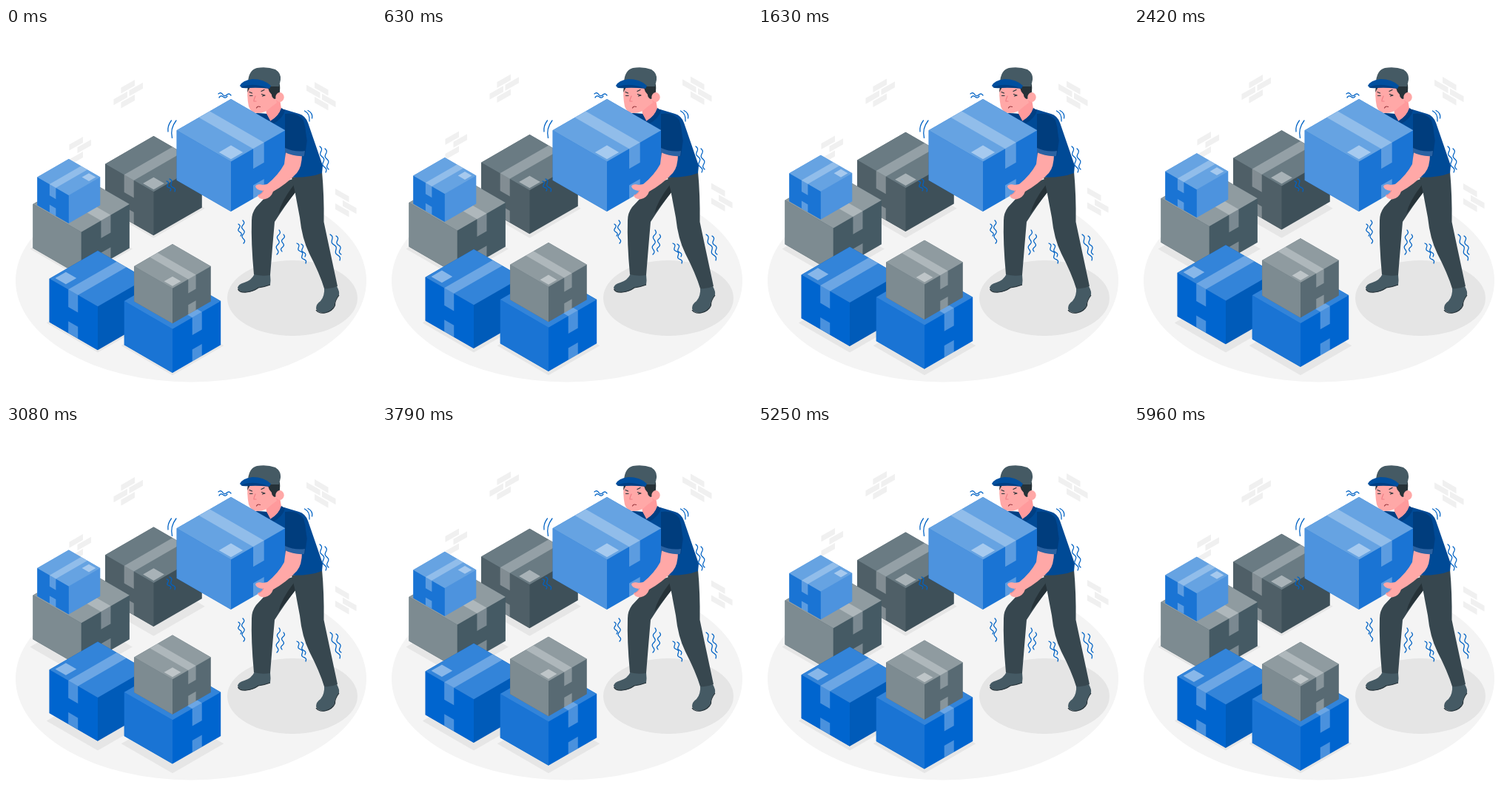
These frames come from a looping animation (500 px wide and 500 px high, 6000 ms). An HTML page:

```html
<!DOCTYPE html>
<html lang="en">
<head>
<meta charset="utf-8">
<title>Moving boxes</title>
<style>
html, body { margin: 0; height: 100%; overflow: hidden; background: #fff; }
svg { display: block; width: 100vw; height: 100vh; }
.lines { fill: none; stroke: #0062c4; stroke-width: 1.25; stroke-linecap: round; stroke-linejoin: round; }
</style>
</head>
<body>
<svg viewBox="0 0 500 500">
  <g id="bricks" fill="#f0f0f0"></g>
  <ellipse cx="250" cy="341.5" rx="237" ry="137" fill="#f4f4f4"/>
  <ellipse cx="387" cy="365" rx="88" ry="51" fill="#e5e5e5"/>
  <g id="shadows" fill="#e6e6e6"></g>
  <g id="pile"></g>

  <!-- legs and shoes -->
  <path fill="#455a64" d="M336 332L357 333Q358 341 357 347Q349 350 341 351Q334 357 324 357Q314 357 313 351Q314 346 322 344Q332 341 336 332Z"/>
  <path fill="none" stroke="#263238" stroke-width="1.2" d="M313.500 353Q316 358 325 357Q334 356 341 351Q349 350 357 347"/>
  <path fill="#455a64" d="M430 350L447 349Q451 356 450 361Q444 368 444 375Q440 384 431 385Q420 385 419 379Q419 373 425 369Q431 362 430 350Z"/>
  <path fill="none" stroke="#263238" stroke-width="1.2" d="M419 381Q422 386 431 385Q441 383 444.500 375Q444 369 450 361"/>
  <path fill="#37474f" d="M356 214L394 202L391 222Q377 240 363 262Q360 296 357 334Q346 336 335 333Q331 290 332 260Q332 250 338 242L352 227Z"/>
  <path fill="#263238" d="M389 212L391 222L368 251Q372 234 389 212Z"/>
  <path fill="#37474f" d="M386 202L427 194Q430 226 429.500 262Q435 288 448 349Q439 353 430 352Q424 332 410 305Q400 285 397 256L390 219Z"/>

  <!-- torso -->
  <path fill="#004a96" d="M336 115L354 116L376 110L396 116Q404 118 408 128L428 186L427 196Q407 204 374 201L350 180Z"/>
  <path fill="#003f83" d="M403 133L407 152L404 173L389 173L387 160Z"/>

  <!-- head -->
  <path fill="#ff9a9c" d="M350 100L370 96L372 109Q369 119 357 126L352 116Z"/>
  <path fill="#ffa8a7" d="M327 77Q325 91 328 106Q331 115 340 115Q351 115 358 107L366 101Q363 86 356 77Z"/>
  <path fill="#263238" d="M351 78L370 76Q371 86 368 94L363 96Q359 94 359 90Q355 86 354 81Z"/>
  <path fill="#263238" d="M327 79L331 78L326 87Z"/>
  <ellipse cx="370" cy="93.500" rx="5.700" ry="6.500" fill="#ffa8a7"/>
  <path fill="#455a64" d="M327 73Q328 57 339 54Q353 52 364 56Q372 61 371 70L369 79L356 79Q343 70 327 73Z"/>
  <path fill="#004f9f" d="M316 78Q319 71 333 69Q349 69 358 78L356 82Q343 77 329 79Q318 82 316 78Z"/>
  <path fill="#003f83" d="M317 80Q327 76 337 77Q348 78 356 82Q340 80 329 81Q320 82 317 80Z"/>
  <g fill="none" stroke="#263238" stroke-width="1.2" stroke-linecap="round">
    <path d="M329 86.500L332.500 88M345 85.500L349 83.500M329.500 91.500L333 91.500M345.500 89.500L350 91M346.500 92L350 91"/>
    <path stroke="#f07f85" d="M337 92Q334.500 98 335 99L338 99"/>
    <path stroke="#9c3c43" d="M338.500 108Q340 105 343.500 106.500"/>
  </g>
  <path fill="#003f83" d="M338 115L352 116L357 125L352 126Z"/>
  <path fill="#003f83" d="M357 126Q369 119 372 108L377 111Q375 122 360 130Z"/>

  <g id="load"></g>

  <!-- arm and sleeve in front of the load -->
  <path fill="#ffa8a7" d="M378 168L400 170Q400 188 393 196Q379 211 361 221Q358 230 349 231.500Q341 231 340 226Q346 224 347 220Q338 219 337 214Q339 210 347 212L353 211Q368 199 376 184Z"/>
  <path fill="none" stroke="#f28a8d" d="M341 226Q347 224 348 219"/>
  <path fill="#003d7d" d="M377 116Q394 113 402 125Q408 142 404 168Q392 171 377 163Z"/>
  <path fill="#2a62a2" d="M377 162Q390 168 404 166L403 173Q389 174 377 168Z"/>

  <g class="lines">
    <path d="M223.500 125Q218 132 219 140M230 125Q221.500 136 224.500 148.500"/>
    <path d="M403.500 112Q411 116 410 126M408 111.500Q415 115 413.500 122"/>
    <path id="waves"/>
  </g>
</svg>
<script>
const $ = id => document.getElementById(id);
const SLOPE = 0.577;
const poly = (pts, fill, alpha = 1) =>
  `<polygon points="${pts.map(p => p.map(n => n.toFixed(2))).join(' ')}"` +
  (fill ? ` fill="${fill}"` : '') + ` fill-opacity="${alpha}"/>`;

// Isometric box: x, y is the rear top corner, w the half width, h the height.
// tape names the side face it runs down; label is the centre on the top face.
function box({ x, y, w, h, top, left, right, tape, label }) {
  const on = (u, v, d = 0) => [x + w * (u - v), y + w * SLOPE * (u + v) + h * d];
  const topQuad = (u0, u1, v0, v1) => [on(u0, v0), on(u1, v0), on(u1, v1), on(u0, v1)];
  const side = (s0, s1, d0, d1) => {
    const at = (s, d) => tape === 'left' ? on(s, 1, d) : on(1, s, d);
    return [at(s0, d0), at(s1, d0), at(s1, d1), at(s0, d1)];
  };
  const a = 0.39, b = 0.59;
  let s = poly([on(0, 0), on(1, 0), on(1, 0, 1), on(1, 1, 1), on(0, 1, 1), on(0, 1)], right)
    + poly([on(0, 1), on(1, 1), on(1, 1, 1), on(0, 1, 1)], left)
    + poly(topQuad(0, 1, 0, 1), top)
    + poly(tape === 'left' ? topQuad(a, b, 0, 1) : topQuad(0, 1, a, b), '#fff', 0.28)
    + poly(side(a, b, 0, 0.4), '#fff', 0.29)
    + poly(side(a, b, 0.73, 1), '#fff', 0.29);
  if (label) {
    const [u, v] = label, r = 0.11;
    s += poly(topQuad(u - r, u + r, v - r, v + r), '#fff', 0.42);
  }
  return s;
}

const BLUE = '#0065cf', MID = '#1a74d4', LIGHT = '#4d93de';
const boxes = [
  { x: 199.5, y: 146, w: 65.3, h: 59, top: '#6a7b83', left: '#4f5f67', right: '#3e5059', tape: 'left', label: [.85, .85], floor: 1 },
  { x: 101.7, y: 200.5, w: 65.2, h: 59.5, top: '#8f9ba0', left: '#7d8b91', right: '#455a64', tape: 'right', floor: 1 },
  { x: 84.8, y: 177, w: 42.5, h: 38, top: '#66a3e2', left: MID, right: LIGHT, tape: 'left', label: [.82, .18] },
  { x: 124, y: 301, w: 65.3, h: 58.8, top: '#3384d9', left: BLUE, right: '#005bb9', tape: 'left', label: [.16, .82], floor: 1 },
  { x: 225, y: 331.5, w: 65.2, h: 59.2, top: '#3384d9', left: MID, right: BLUE, tape: 'right', floor: 1 },
  { x: 225, y: 292, w: 51.8, h: 47.5, top: '#8f9ba0', left: '#7d8b91', right: '#586a73', tape: 'right', label: [.84, .84] }
];
$('pile').innerHTML = boxes.map(box).join('');
$('load').innerHTML = box({ x: 304, y: 96, w: 73.3, h: 67.5, top: '#66a3e2', left: LIGHT, right: MID, tape: 'right', label: [.85, .85] });

$('shadows').innerHTML = boxes.filter(b => b.floor).map(({ x, y, w, h }) => {
  const cy = y + h + w * SLOPE + 1, r = w + 4, k = r * SLOPE;
  return poly([[x, cy - k], [x + r, cy], [x, cy + k], [x - r, cy]]);
}).join('');

// Brick slots: inner x, top y; each brick rises to the right unless mirrored.
const slots = [[174, 70], [185, 73.7], [164, 85.7], [174, 90]];
const cluster = (dx, dy, mirror, keep) => keep.map(i => {
  const [x, y] = slots[i];
  const at = (px, py) => [(mirror ? 591 - px : px) + dx, py + dy];
  return poly([at(x, y), at(x - 18.5, y + 10.6), at(x - 18.5, y + 18.6), at(x, y + 8)]);
}).join('');
$('bricks').innerHTML = cluster(0, 0, false, [0, 1, 2, 3])
  + cluster(-70, 77, false, [0, 1, 3])
  + cluster(0, 3, true, [0, 1, 2, 3])
  + cluster(28, 147, true, [0, 2, 3]);

// Wavy stroke between two points with n full waves.
function wave([x0, y0, x1, y1, n]) {
  const dx = x1 - x0, dy = y1 - y0, len = Math.hypot(dx, dy), steps = n * 12;
  let d = '';
  for (let i = 0; i <= steps; i++) {
    const p = i / steps, o = 1.7 * Math.sin(p * n * 2 * Math.PI) / len;
    d += (i ? 'L' : 'M') + (x0 + dx * p + dy * o).toFixed(2) + ' ' + (y0 + dy * p - dx * o).toFixed(2);
  }
  return d;
}
$('waves').setAttribute('d', [
  [287, 89, 304, 91, 1.5], [288, 94, 299, 92, 1],
  [424, 160, 432, 195, 2.5], [431, 163, 436, 191, 2],
  [314, 265, 317, 281, 1.5], [320, 260, 321, 291, 2.5],
  [369, 273, 366, 306, 2.5], [375, 279, 373, 302, 2],
  [393, 291, 405, 318, 2.5], [399, 292, 404, 309, 1.5],
  [438, 279, 451, 314, 2.5], [446, 281, 453, 306, 2],
  [217, 207, 222, 220, 1.5], [221, 204, 228, 221, 1.5]
].map(wave).join(''));

// Linear rise and fall, 0 to 1 to 0 over one period.
const swing = (t, period) => 1 - Math.abs(1 - 2 * (t % period) / period);
const lift = (id, y) => $(id).setAttribute('transform', `translate(0 ${-y.toFixed(3)})`);

function draw(now) {
  const t = now % 6000;
  lift('pile', 9.7 * swing(t, 6000));
  lift('bricks', 9 * swing(t, 1500));
  requestAnimationFrame(draw);
}
draw(performance.now());
</script>
</body>
</html>
```
